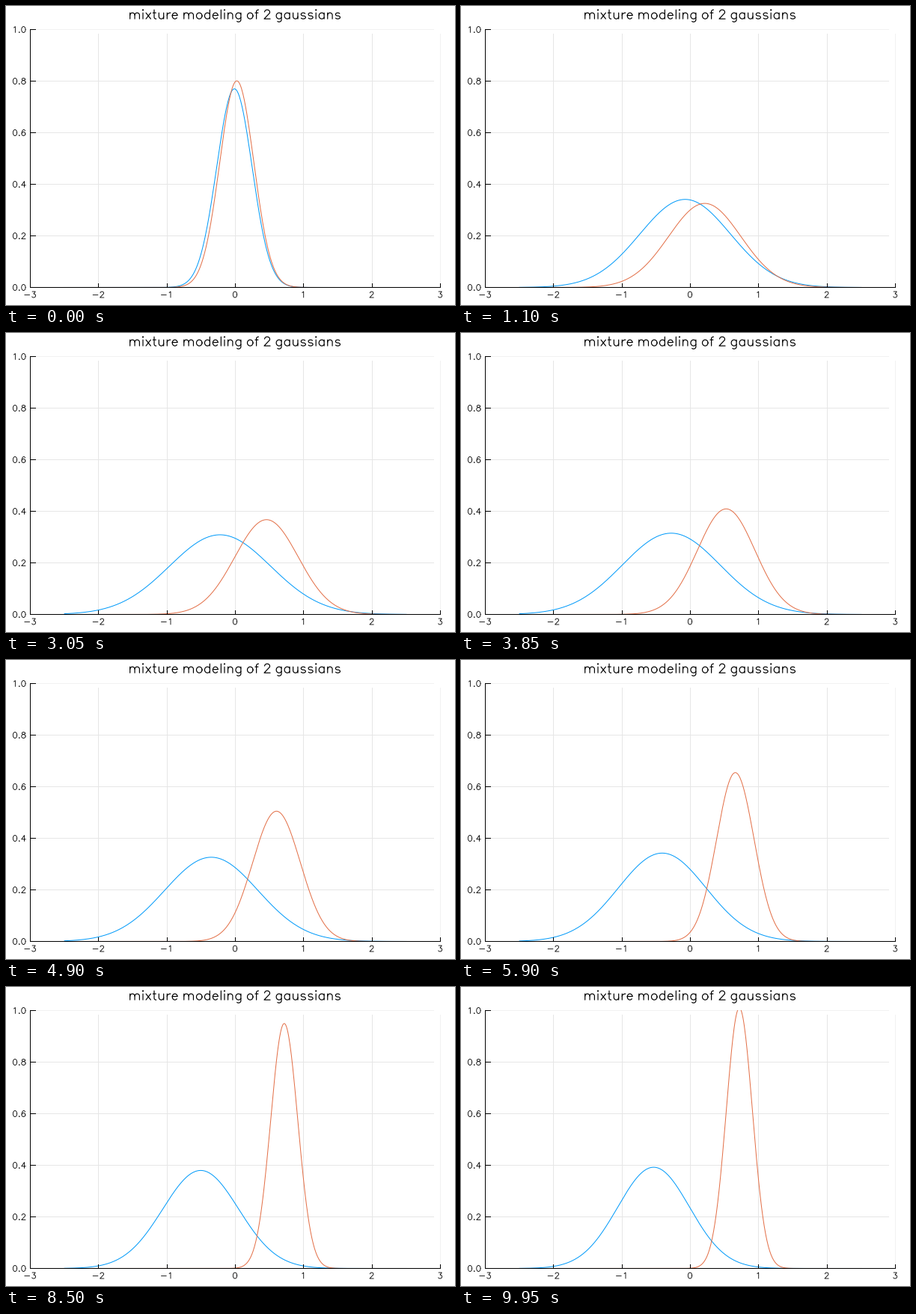
A matplotlib script that plays this animation: 600x400 px, repeating every 10 s.

```python
import numpy as np
import matplotlib.pyplot as plt
from matplotlib.animation import FuncAnimation
from matplotlib.collections import LineCollection

W, H, DPI = 600, 400, 100
STEPS, STEP_MS = 200, 50
PX = 72 / DPI  # one pixel in points
LEFT, RIGHT, TOP, BOTTOM = 32.5, 580.5, 31.5, 376.5
BLUE, ORANGE = "#009AFA", "#E36F47"
GRID, EDGE = "#e6e6e6", "#f2f2f2"

fig = plt.figure(figsize=(W / DPI, H / DPI), dpi=DPI, facecolor="white")
ax = fig.add_axes([0, 0, 1, 1])
ax.set_xlim(0, W)
ax.set_ylim(H, 0)
ax.axis("off")


def px(x):
    return LEFT + (x + 3) / 6 * (RIGHT - LEFT)


def py(y):
    return BOTTOM - y * (BOTTOM - TOP)


# --- single-stroke lettering built from stems, bars and arcs ---

CAP, MID = 21, 14  # heights of capitals and of small letters


def arc(cx, cy, rx, ry, start=0, end=360):
    t = np.radians(np.linspace(start, end, 33))
    return list(zip(cx + rx * np.cos(t), cy + ry * np.sin(t)))


def line(*p):
    return list(zip(p[::2], p[1::2]))


def stem(x, top=MID, foot=0):
    return line(x, top, x, foot)


def bar(x0, x1, y):
    return line(x0, y, x1, y)


def arch(x):
    return arc(x + 5.5, 8.5, 5.5, 5.5, 180, 0) + [(x + 11, 0)]


def dot(x, y):
    return arc(x, y, 0.8, 0.8)


def ring(cy, rx, ry):
    return arc(10, cy, rx, ry)


bowl = arc(9.5, 7, 6.5, 7, 32, 328)

# each glyph: advance width, then its strokes
glyphs = {
    " ": (8,),
    "a": (19, bowl, stem(15)),
    "d": (19, bowl, stem(15, CAP)),
    "e": (18, bar(3, 15, 8) + arc(9, 7, 6, 7, 8, 320)),
    "f": (12, arc(10, 17, 5, 4, 90, 180) + [(5, 0)], bar(2, 9, MID)),
    "g": (19, bowl, stem(15, MID, -2) + arc(9.5, -2, 5.5, 5, 0, -130)),
    "i": (8, stem(4), dot(4, CAP - 0.5)),
    "l": (8, stem(4, CAP)),
    "m": (30, stem(4), arch(4), arch(15)),
    "n": (19, stem(4), arch(4)),
    "o": (19, arc(9.5, 7, 6.5, 7)),
    "r": (13, stem(4), arc(12, 8, 8, 6, 180, 90)),
    "s": (17, arc(8.5, 10.5, 5, 3.5, 30, 270) + arc(8.5, 3.5, 5.5, 3.5, 90, -150)),
    "t": (12, [(5, CAP)] + arc(9, 4, 4, 4, 180, 280), bar(2, 9, MID)),
    "u": (19, [(4, MID)] + arc(9.5, 5.5, 5.5, 5.5, 180, 360), stem(15)),
    "x": (17, line(3, MID, 14, 0), line(14, MID, 3, 0)),
    "0": (20, ring(10.5, 7, 10.5)),
    "1": (20, line(6, 17, 11, CAP, 11, 0)),
    "2": (20, arc(10, 15.5, 6, 5.5, 175, -25) + bar(3, 17, 0)),
    "3": (20, line(5, CAP, 16, CAP, 10, 13) + arc(10, 6.5, 7, 6.5, 90, -150)),
    "4": (20, line(13, 0, 13, CAP, 3, 7, 18, 7)),
    "6": (20, arc(11, 8, 7, 13, 45, 180), ring(6.5, 6.5, 6.5)),
    "8": (20, ring(17, 5.5, 4), ring(6.5, 7, 6.5)),
    ".": (10, dot(5, 1)),
    "-": (26, bar(4, 22, 9)),
}


def write(text, x, base, scale, align=0.5, weight=0.85):
    """Place text so that the given share of its width lies left of x."""
    pen, strokes = 0, []
    for ch in text:
        advance, *parts = glyphs[ch]
        strokes += [np.array(p) + (pen, 0) for p in parts]
        pen += advance
    x0 = x - align * pen * scale
    paths = [np.column_stack([x0 + s[:, 0] * scale, base - s[:, 1] * scale])
             for s in strokes]
    ax.add_collection(LineCollection(paths, colors="black", linewidths=weight * PX,
                                     capstyle="round", snap=False, zorder=4))


def rule(x0, y0, x1, y1, color="black"):
    ax.plot([x0, x1], [y0, y1], color=color, lw=PX, snap=False,
            zorder=3 if color == "black" else 1, solid_capstyle="butt")


# --- grid, axes and labels ---

def pixel(v):
    return np.floor(v) + 0.5


for k in range(-3, 4):
    x = pixel(px(k))
    if k > -3:
        rule(x, 37, x, 376, GRID if k < 3 else EDGE)
    rule(x, 371, x, 376)
    write(str(k), px(k) - 0.5, 390, 0.38)

for k in range(6):
    y = pixel(py(k / 5))
    if k:
        rule(32, y, 572, y, GRID if k < 5 else EDGE)
    rule(32, y, 40, y)
    write(f"{k / 5:.1f}", 27.2, y + 4, 0.38, align=1)

rule(LEFT, 31, LEFT, 377)
rule(32, BOTTOM, 581, BOTTOM)
write("mixture modeling of 2 gaussians", 305.8, 17.2, 0.5765, weight=1.2)


# --- the fit: both bells widen quickly, then drift apart and sharpen ---

knots = np.array([0, 21, 46, 77, 118, 138, 170, 199])
gap = [0.035, 0.275, 0.548, 0.804, 1.070, 1.149, 1.222, 1.254]
spread_b = [0.259, 0.655, 0.740, 0.718, 0.641, 0.601, 0.555, 0.525]
spread_o = [0.249, 0.525, 0.495, 0.422, 0.274, 0.228, 0.198, 0.191]
# variances change more evenly than deviations
path = np.column_stack([gap, np.square(spread_b), np.square(spread_o)])
slopes = np.gradient(path, knots, axis=0)


def glide(n):
    """Cubic Hermite blend between the knots."""
    i = min(np.searchsorted(knots, n, side="right") - 1, len(knots) - 2)
    h = knots[i + 1] - knots[i]
    t = (n - knots[i]) / h
    return ((1 + 2 * t) * (1 - t) ** 2 * path[i]
            + t * (1 - t) ** 2 * h * slopes[i]
            + t * t * (3 - 2 * t) * path[i + 1]
            + t * t * (t - 1) * h * slopes[i + 1])


def bell(weight, mean, var):
    return weight * np.exp(-(xs - mean) ** 2 / (2 * var)) / np.sqrt(2 * np.pi * var)


xs = np.linspace(-2.5, 2.5, 501)
frame = plt.Rectangle((LEFT, TOP - 0.5), RIGHT - LEFT, BOTTOM - TOP + 1,
                      transform=ax.transData)
curves = [ax.plot([], [], color=c, lw=PX, zorder=2)[0] for c in (BLUE, ORANGE)]
for curve in curves:
    curve.set_clip_path(frame)


def update(n):
    dist, var_b, var_o = glide(n)
    w = 0.6 - 0.00042 * n - 0.1 * np.exp(-n / 15)  # share of the blue bell
    center = 0.069 * (1 - 0.95 ** (n + 1))         # mean of the whole mixture
    blue = bell(w, center - (1 - w) * dist, var_b)
    orange = bell(1 - w, center + w * dist, var_o)
    for curve, ys in zip(curves, (blue, orange)):
        curve.set_data(px(xs), py(ys))
    return curves


anim = FuncAnimation(fig, update, frames=STEPS, interval=STEP_MS,
                     repeat=True, repeat_delay=0)
plt.show()
```
